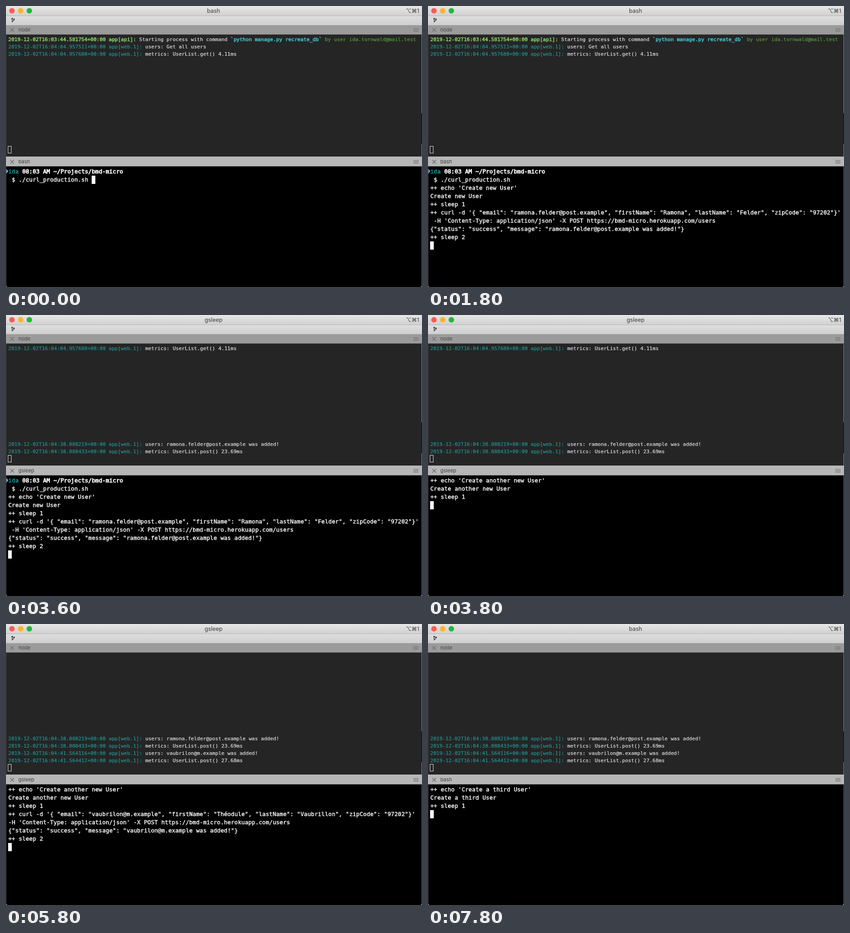
These frames come from a looping animation (909 px wide and 616 px high, 8 s). An HTML page:

```html
<!DOCTYPE html>
<html lang="en">
<head>
<meta charset="utf-8">
<title>Terminal</title>
<style>
html, body { margin: 0; width: 100%; height: 100%; overflow: hidden; background: #000; }
svg { display: block; width: 909px; height: 616px; }
text { white-space: pre; }
.mono { font-family: "DejaVu Sans Mono", monospace; }
.log { font-size: 11.05px; fill: #e2e2e2; stroke: #e2e2e2; stroke-width: .2px; }
.shell { font-size: 12.645px; fill: #fff; stroke: #fff; stroke-width: .4px; }
.ui { font-family: Inter, "DejaVu Sans", sans-serif; fill: #3c3c3c; }
.b { stroke-width: .8px; }
.lime { fill: #8bd368; stroke: #8bd368; stroke-width: .6px; }
.cyan { fill: #3fc8d4; stroke: #3fc8d4; stroke-width: .6px; }
.green { fill: #5c9c40; stroke: #5c9c40; }
.teal { fill: #1f9896; stroke: #1f9896; }
.user { fill: #17a3a3; stroke: #17a3a3; }
</style>
</head>
<body>
<svg viewBox="0 0 909 616">
  <defs>
    <linearGradient id="bar" x2="0" y2="1">
      <stop stop-color="#e6e6e6"/><stop offset="1" stop-color="#d0d0d0"/>
    </linearGradient>
    <linearGradient id="tool" x2="0" y2="1">
      <stop stop-color="#dedede"/><stop offset="1" stop-color="#cfcfcf"/>
    </linearGradient>
    <g id="controls" fill="none" stroke-width="1.1">
      <path d="M9.5 6.5l8 8m0-8l-8 8"/>
      <path d="M890 7.5h11.5m-11.5 3h11.5m-11.5 3h11.5"/>
    </g>
  </defs>

  <rect width="909" height="22" fill="url(#bar)"/>
  <path d="M0 21.5h909" stroke="#b4b4b4"/>
  <circle cx="13" cy="10.5" r="6" fill="#fc5b57"/>
  <circle cx="32" cy="10.5" r="6" fill="#fdb32e"/>
  <circle cx="51" cy="10.5" r="6" fill="#1fb93b"/>
  <text id="title" class="ui" x="453.5" y="15.2" font-size="12.4" text-anchor="middle"></text>
  <text class="ui" x="903" y="15.2" font-size="12" text-anchor="end">⌥⌘1</text>

  <rect y="22" width="909" height="20" fill="url(#tool)"/>
  <path d="M13.5 27v9M13.5 33.5q4 0 4-4.5M11.8 28.3l1.7-1.8 1.7 1.8M15.8 29.8l1.7-1.8 1.7 1.8" fill="none" stroke="#111" stroke-width="1.1"/>

  <rect y="42" width="909" height="21" fill="#9b9b9b"/>
  <use href="#controls" y="42" stroke="#6b6b6b"/>
  <text class="ui" x="27" y="56.2" font-size="11" style="fill:#474747">node</text>
  <rect y="62.5" width="909" height="268" fill="#252525"/>
  <g id="log" class="mono log"></g>
  <rect x="4.5" y="307.5" width="7" height="15" fill="none" stroke="#e2e2e2"/>

  <rect y="330" width="909" height="22" fill="#b7b7b7"/>
  <use href="#controls" y="331" stroke="#626262"/>
  <text id="job" class="ui" x="27" y="345.2" font-size="11"></text>
  <rect y="351.5" width="909" height="264.5"/>
  <path id="mark" d="M1 357l4 5.2-4 5.2z" fill="#55b4e8"/>
  <g id="shell" class="mono shell"></g>
  <rect id="cursor" width="8" height="18" fill="#fff"/>

  <path d="M.5 63v267M.5 352v264" stroke="#3c3c3c"/>
  <path d="M908.5 63v172M908.5 303v27" stroke="#909090"/>
  <path d="M908.5 352v264" stroke="#666"/>
  <path d="M908.5 235v68" stroke="#080808"/>
  <path d="M0 612v4h4q-4 0-4-4M909 612v4h-4q4 0 4-4" fill="#ddd"/>
</svg>
<script>
const LOOP = 8000;
const COL = 7.61;
const $ = id => document.getElementById(id);

// Each line is a list of [text, class] runs.
const web = (time, text) => [[`2019-12-02T16:04:${time}+00:00 app[web.1]: `, 'teal'], [text]];
const plain = text => [[text]];

const mailA = 'ramona.felder@post.example';
const mailB = 'vaubrilon@m.example';

const started = [
  ['2019-12-02T16:03:44.581754+00:00 app[api]: ', 'lime'],
  ['Starting process with command '],
  ['`python manage.py recreate_db`', 'cyan'],
  [' by user ida.tornwald@mail.test', 'green']
];
const listed = web('04.957511', 'users: Get all users');
const timed = web('04.957680', 'metrics: UserList.get() 4.11ms');
const postA = [
  web('38.088219', `users: ${mailA} was added!`),
  web('38.088433', 'metrics: UserList.post() 23.69ms')
];
const postB = [
  web('41.564116', `users: ${mailB} was added!`),
  web('41.564412', 'metrics: UserList.post() 27.68ms')
];
const gap = n => Array(n).fill(plain(''));

const logs = [
  [0, [started, listed, timed]],
  [2200, [timed, ...gap(12), ...postA]],
  [5800, [...gap(11), ...postA, ...postB]]
];

const prompt = [
  [['ida', 'user'], [' 08:03 AM ~/Projects/bmd-micro', 'b']],
  plain(' $ ./curl_production.sh ')
];
const greet = text => [`++ echo '${text}'`, text, '++ sleep 1'].map(plain);
// The terminal wraps after 118 columns.
const curl = (mail, first, last) => {
  const cmd = `++ curl -d '{ "email": "${mail}", "firstName": "${first}", "lastName": "${last}", "zipCode": "97202"}'` +
    ` -H 'Content-Type: application/json' -X POST https://bmd-micro.herokuapp.com/users`;
  return [cmd.slice(0, 118), cmd.slice(118)].map(plain);
};
const reply = mail => [`{"status": "success", "message": "${mail} was added!"}`, '++ sleep 2'].map(plain);

const first = [...prompt, ...greet('Create new User')];
const firstCurl = [...first, ...curl(mailA, 'Ramona', 'Felder')];
const second = greet('Create another new User');
const secondCurl = [...second, ...curl(mailB, 'Théodule', 'Vaubrillon')];

const shells = [
  [0, prompt],
  [200, first],
  [1200, firstCurl],
  [1800, [...firstCurl, ...reply(mailA)]],
  [3800, second],
  [4800, secondCurl],
  [5400, [...secondCurl, ...reply(mailB)]],
  [7400, greet('Create a third User')]
];

const jobs = [
  [0, 'bash'], [600, 'gsleep'], [1200, 'bash'], [2000, 'gsleep'],
  [4800, 'bash'], [5600, 'gsleep'], [7600, 'bash']
];

const at = (steps, t) => steps.findLast(([start]) => start <= t)[1];

function rows(lines, top, pitch) {
  return lines.map((runs, i) => {
    const spans = runs.map(([text, cls = '']) => `<tspan class="${cls}">${text}</tspan>`).join('');
    return `<text x="5" y="${top + i * pitch}">${spans}</text>`;
  }).join('');
}

const shown = {};
function update(key, value, draw) {
  if (shown[key] === value) return;
  shown[key] = value;
  draw(value);
}

function drawShell(lines) {
  const typing = lines === prompt;
  const row = typing ? 1 : lines.length;
  $('shell').innerHTML = rows(lines, 366.8, 18.08);
  $('mark').style.display = lines[0] === prompt[0] ? '' : 'none';
  $('cursor').setAttribute('x', typing ? 5 + 24 * COL - .4 : 4.6);
  $('cursor').setAttribute('y', Math.round(353.6 + row * 18.08));
}

function frame() {
  const t = performance.now() % LOOP;
  update('log', at(logs, t), lines => $('log').innerHTML = rows(lines, 77, 16.15));
  update('shell', at(shells, t), drawShell);
  update('job', at(jobs, t), name => $('title').textContent = $('job').textContent = name);
  requestAnimationFrame(frame);
}
frame();
</script>
</body>
</html>
```
